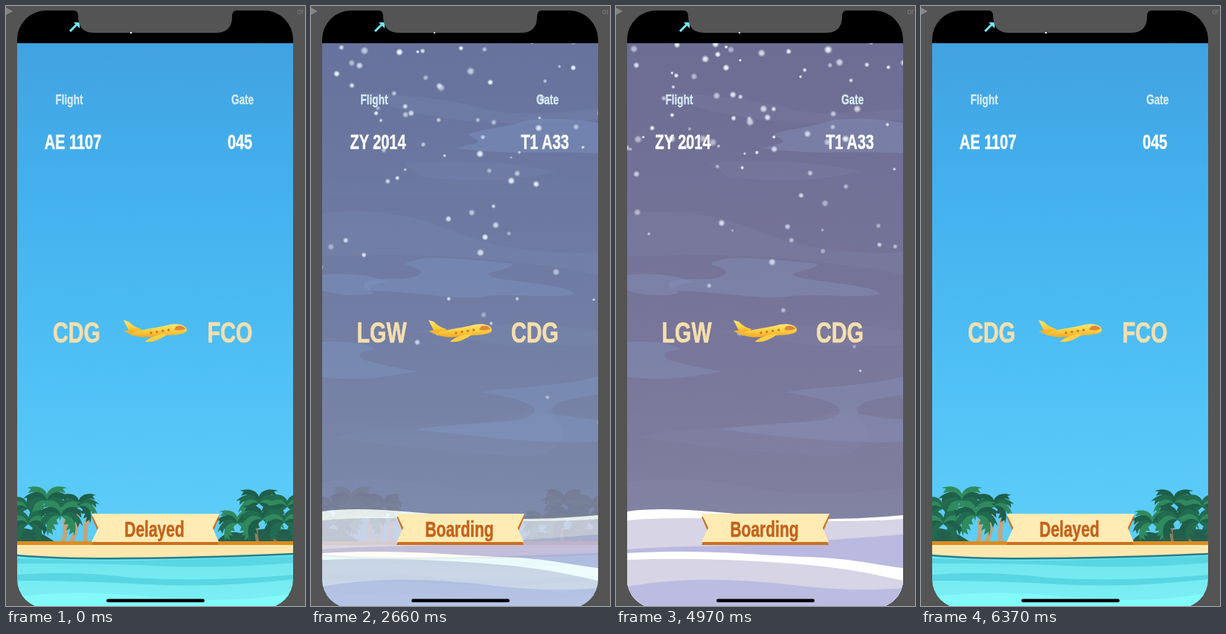
An HTML page for the animation above (6440 ms loop, 402 by 806 pixels).

```html
<!DOCTYPE html>
<html lang="en">
<head>
<meta charset="utf-8">
<title>Flight status</title>
<style>
  html, body { margin: 0; width: 100%; height: 100%; overflow: hidden; background: #545454; }
  svg { display: block; width: 402px; height: 806px; }
  text { font-family: "Liberation Sans", Arial, sans-serif; font-weight: bold; text-anchor: middle; }
</style>
</head>
<body>
<svg viewBox="0 0 402 806">
  <defs>
    <clipPath id="screen"><rect x="15" y="6" width="371" height="803" rx="39"/></clipPath>
    <clipPath id="view"><rect x="15" y="50" width="371" height="760"/></clipPath>
    <linearGradient id="daySky" x2="0" y2="1">
      <stop stop-color="#42a2e1"/><stop offset=".3" stop-color="#43b1ee"/>
      <stop offset=".62" stop-color="#4ebff5"/><stop offset="1" stop-color="#5fcffa"/>
    </linearGradient>
    <linearGradient id="snowSky" x2="0" y2="1">
      <stop stop-color="#6d6c93"/><stop offset=".5" stop-color="#767499"/><stop offset="1" stop-color="#83819f"/>
    </linearGradient>
    <linearGradient id="sea" x2="0" y2="1">
      <stop stop-color="#6fe4ec"/><stop offset="1" stop-color="#7cf2f5"/>
    </linearGradient>
    <linearGradient id="gold" x2="0" y2="1">
      <stop stop-color="#ffe777"/><stop offset=".5" stop-color="#fdd140"/><stop offset="1" stop-color="#f2a726"/>
    </linearGradient>
    <radialGradient id="flake">
      <stop offset=".35" stop-color="#f0f8ff"/><stop offset="1" stop-color="#f0f8ff" stop-opacity="0"/>
    </radialGradient>
    <path id="frond" d="M0 0C5-11 21-14 32 5L27 2 26 9 21 2 19 8 15 0 11 5 8-1Z"/>
  </defs>

  <!-- device surroundings -->
  <path d="M0 2L9 7 0 12Z" fill="#858585"/>
  <text x="396" y="11" font-size="10" style="font-weight:400" fill="#7c7c7c">or</text>

  <g clip-path="url(#screen)">
    <g clip-path="url(#view)">
      <g id="summer">
        <rect x="15" y="50" width="371" height="680" fill="url(#daySky)"/>
        <path d="M15 702Q35 698 66 720H15ZM283 720Q295 703 315 708Q345 699 386 704V720Z" fill="#235f4e"/>
        <g fill="none" stroke="#c3a57b" stroke-width="6">
          <path d="M94 676Q99 697 88 720M78 690Q82 704 77 720M110 688Q105 703 107 720"/>
          <path d="M341 684Q334 702 338 720M364 690Q359 704 362 720" stroke="#8b8061" stroke-width="4"/>
        </g>
        <g id="palms"></g>
        <rect x="15" y="723" width="371" height="25" fill="#ffe8ae"/>
        <rect x="15" y="719" width="371" height="5" fill="#de8c22"/>
        <path d="M15 738C90 745 220 743 386 736V810H15Z" fill="url(#sea)"/>
        <path d="M15 738C90 745 220 743 386 736" fill="none" stroke="#287f8c" stroke-width="2.5"/>
        <g fill="#58d6e4">
          <path d="M15 742Q120 747 220 744T386 739V748Q290 756 200 752T15 749Z"/>
          <path d="M15 764Q90 758 170 768Q270 774 386 764V770Q280 782 190 777T15 772Z"/>
        </g>
        <path d="M15 793Q105 784 200 794T386 789V810H15Z" fill="#82fafa"/>
      </g>

      <g id="winter">
        <rect x="15" y="50" width="371" height="680" fill="url(#snowSky)"/>
        <g fill="#8492bb" fill-opacity=".42">
          <path d="M194 191C225 184 235 183 214 175C202 168 265 164 292 153Q340 149 386 157V198C310 194 270 201 194 191Z"/>
          <path d="M126 347C145 332 200 340 270 346C275 353 238 356 238 361C250 371 345 372 355 387C320 394 270 385 235 390C190 396 145 383 80 383C55 370 85 365 125 367C165 360 145 352 126 347Z"/>
          <path d="M15 361Q65 356 105 371Q65 375 85 386Q50 393 15 382Z"/>
          <path d="M15 451Q65 449 88 461Q55 465 70 475Q105 485 143 491Q65 506 15 498Z"/>
          <path d="M228 519C275 510 320 513 386 498V522C350 528 315 532 326 548Q355 553 386 556V585C320 590 220 578 142 569C185 560 245 562 284 555C325 542 286 527 228 519Z"/>
        </g>
        <g fill="#8b8eb1" fill-opacity=".16">
          <path d="M15 278Q110 268 190 302T386 331V361Q210 326 15 337Z"/>
          <path d="M70 116Q180 123 228 137T386 138V152Q270 164 182 151T70 116Z"/>
          <path d="M35 580C80 560 235 574 290 545Q330 538 340 575Q333 605 280 605Q150 597 35 580Z"/>
          <path d="M125 211Q240 202 330 222Q260 241 150 230Z"/>
          <path d="M135 438Q280 418 386 437V455Q280 461 225 450T135 438Z"/>
          <path d="M15 640Q80 628 175 646T386 647V690H15Z"/>
        </g>
        <path d="M15 679C70 671 140 681 210 686S330 689 386 684V810H15Z" fill="#fff"/>
        <path d="M15 691C80 685 145 690 220 691S330 693 386 689V810H15Z" fill="#d6d4e5"/>
        <path d="M15 730C85 724 145 727 220 722S330 714 386 710V810H15Z" fill="#bbb9e0"/>
        <path d="M15 735C120 729 190 738 255 740S350 751 386 755V810H15Z" fill="#fff"/>
        <path d="M15 744C110 740 205 746 260 751S350 764 386 772V810H15Z" fill="#d6d4e5"/>
        <path d="M15 780C90 766 170 770 240 778S345 785 386 782V810H15Z" fill="#bcbbe1"/>
      </g>
      <g id="snow" fill="url(#flake)"></g>

      <!-- aeroplane -->
      <path d="M158 422L165 424Q171 431 182 434L178 440 166 438Z" fill="url(#gold)"/>
      <path d="M158 437Q167 434 178 437L171 443 165 440Z" fill="#f4b433"/>
      <path d="M168 440C180 434 201 433 220 428C236 425 244 431 243 436C241 442 224 442 208 443C191 446 175 446 168 440Z" fill="url(#gold)"/>
      <path d="M229 430Q239 428 241 434Q234 437 226 435Z" fill="#de8738"/>
      <path d="M195 439L220 435" stroke="#cf7c30" stroke-width="3.6" stroke-linecap="round" stroke-dasharray="0 8"/>
      <path d="M213 440C203 442 191 446 187 451Q201 453 217 441Z" fill="#fdcf45"/>

      <!-- banner -->
      <path d="M115 686H287L279 705 286 724H115L123 705Z" fill="#cc701f"/>
      <path d="M115 682H287L278 701 286 720H115L124 701Z" fill="#ffebb4"/>
      <g id="labels"></g>
    </g>

    <rect x="15" y="0" width="371" height="50"/>
    <path d="M86 34L95 25" stroke="#72e7f5" stroke-width="3"/>
    <path d="M91 22H99V30Z" fill="#72e7f5"/>
    <path d="M91 6Q97 6 97 14Q97 36 119 36H282Q304 36 304 14Q304 6 310 6Z" fill="#545454"/>
    <rect id="dot" y="35" width="2" height="2" fill="#fff"/>
    <rect x="135" y="796.5" width="132" height="4.5" rx="2.2"/>
  </g>
</svg>

<script>
const LOOP = 6.44, TO_WINTER = 1.905, TO_SUMMER = 5.35, CONDENSE = 0.73;
const byId = id => document.getElementById(id);
const clamp = v => Math.min(1, Math.max(0, v));

function add(parent, tag, attributes) {
  const el = document.createElementNS(parent.namespaceURI, tag);
  for (const name in attributes) el.setAttribute(name, attributes[name]);
  return parent.appendChild(el);
}

// Cubic Bezier easing with control points (x1, 0) and (x2, 1).
const bezier = (x1, x2) => x => {
  x = clamp(x);
  let low = 0, high = 1;
  for (let i = 0; i < 20; i++) {
    const s = (low + high) / 2, r = 1 - s;
    if (3 * r * r * s * x1 + 3 * r * s * s * x2 + s ** 3 < x) low = s; else high = s;
  }
  return low * low * (3 - 2 * low);
};
const easeIn = bezier(0.42, 1), easeOut = bezier(0, 0.58), easeInOut = bezier(0.42, 0.58);

let seed = 11;
const random = () => (seed = seed * 16807 % 2147483647) / 2147483647;

// Palm crowns: x, y, size
const crowns = [[28, 675, .8], [55, 665, 1], [98, 672, .85], [30, 696, .95], [74, 685, 1],
  [340, 668, .95], [378, 673, .85], [311, 695, .9], [345, 690, 1], [374, 694, .95]];
crowns.forEach(([x, y, size], n) => {
  const crown = add(byId('palms'), 'g', {transform: `translate(${x} ${y}) scale(${size})`});
  [-42, -14, 16, 48].forEach((angle, i) => {
    for (const side of [-1, 1]) add(crown, 'use', {
      href: '#frond', transform: `scale(${side} 1) rotate(${angle})`,
      fill: ['#226b50', '#2f8a5e', '#1e5f4a'][(n + i) % 3]
    });
  });
});

const flakes = Array.from({length: 240}, (_, i) => ({
  el: add(byId('snow'), 'circle', {}),
  birth: i / 60,
  x: 15 + 390 * random() ** 1.35,
  y: -30 + 30 * random(),
  angle: Math.PI + (random() - 0.5) * Math.PI / 2,
  speed: 20 + (random() - 0.5) * 200,
  life: 2.3 + 1.7 * random(),
  radius: 2.4 + 4.2 * random(),
  alpha: 0.65 + 0.5 * random()
}));

function drawSnow(t) {
  for (const f of flakes) {
    const age = (t + 4 - f.birth) % 4;
    const distance = f.speed * age;
    f.el.setAttribute('cx', f.x + Math.cos(f.angle) * distance + 5 * age * age);
    f.el.setAttribute('cy', f.y + Math.sin(f.angle) * distance + 35 * age * age);
    f.el.setAttribute('r', age < f.life ? f.radius * (1 - 0.06 * age) : 0);
    f.el.setAttribute('opacity', clamp(f.alpha - 0.08 * age));
  }
}

function makeText(content, x, y, size, fill) {
  const el = add(byId('labels'), 'text', {
    y: size * 0.344, 'font-size': size, fill, stroke: fill, 'stroke-width': size * 0.018
  });
  el.textContent = content;
  const place = (dx, dy, opacity = 1, scaleY = 1) => {
    el.setAttribute('transform', `translate(${x + dx} ${y + dy}) scale(${CONDENSE} ${scaleY})`);
    el.setAttribute('opacity', opacity);
  };
  place(0, 0);
  return place;
}

const pair = (summer, winter, ...style) => [makeText(summer, ...style), makeText(winter, ...style)];

makeText('Flight', 85, 125.5, 18.6, '#d8edf7');
makeText('Gate', 318, 125.5, 18.6, '#d8edf7');
const rolling = [
  pair('AE 1107', 'ZY 2014', 90, 182.5, 27.3, '#fff'),
  pair('045', 'T1 A33', 314.5, 182.5, 27.3, '#fff')
];
const sliding = [
  {texts: pair('CDG', 'LGW', 95, 438.5, 39.4, '#f5dfae'), offset: dir => [80 * dir, 0]},
  {texts: pair('FCO', 'CDG', 301, 438.5, 39.4, '#f5dfae'), offset: dir => [0, 50 * dir]},
  {texts: pair('Delayed', 'Boarding', 199.5, 703, 28.8, '#c2631b'), offset: () => [0, 20]}
];

function draw(t) {
  const winter = t >= TO_WINTER && t < TO_SUMMER;
  const elapsed = winter ? t - TO_WINTER : t >= TO_SUMMER ? t - TO_SUMMER : 9;
  const current = winter ? 1 : 0, dir = winter ? 1 : -1;
  const toward = p => winter ? p : 1 - p;

  byId('winter').setAttribute('opacity', toward(easeInOut(elapsed)));
  byId('snow').setAttribute('opacity', toward(easeInOut(elapsed / 0.5)));
  byId('dot').setAttribute('x', winter ? 165 : 167);
  drawSnow(t);

  const roll = easeOut(elapsed / 0.5);
  for (const texts of rolling) {
    texts[current](0, 11 * dir * (1 - roll), 1, 0.1 + 0.9 * roll);
    texts[1 - current](0, -11 * dir * roll, roll < 0.999 ? 1 : 0, 1 - 0.9 * roll);
  }

  const leave = easeIn(elapsed / 0.5), arrive = easeIn((elapsed - 0.1) / 0.25);
  for (const {texts, offset} of sliding) {
    const [dx, dy] = offset(dir);
    texts[current](dx * (1 - arrive), dy * (1 - arrive), arrive);
    texts[1 - current](dx * leave, dy * leave, 1 - leave);
  }
}

const start = performance.now();
function frame() {
  draw((performance.now() - start) / 1000 % LOOP);
  requestAnimationFrame(frame);
}
frame();
</script>
</body>
</html>
```
